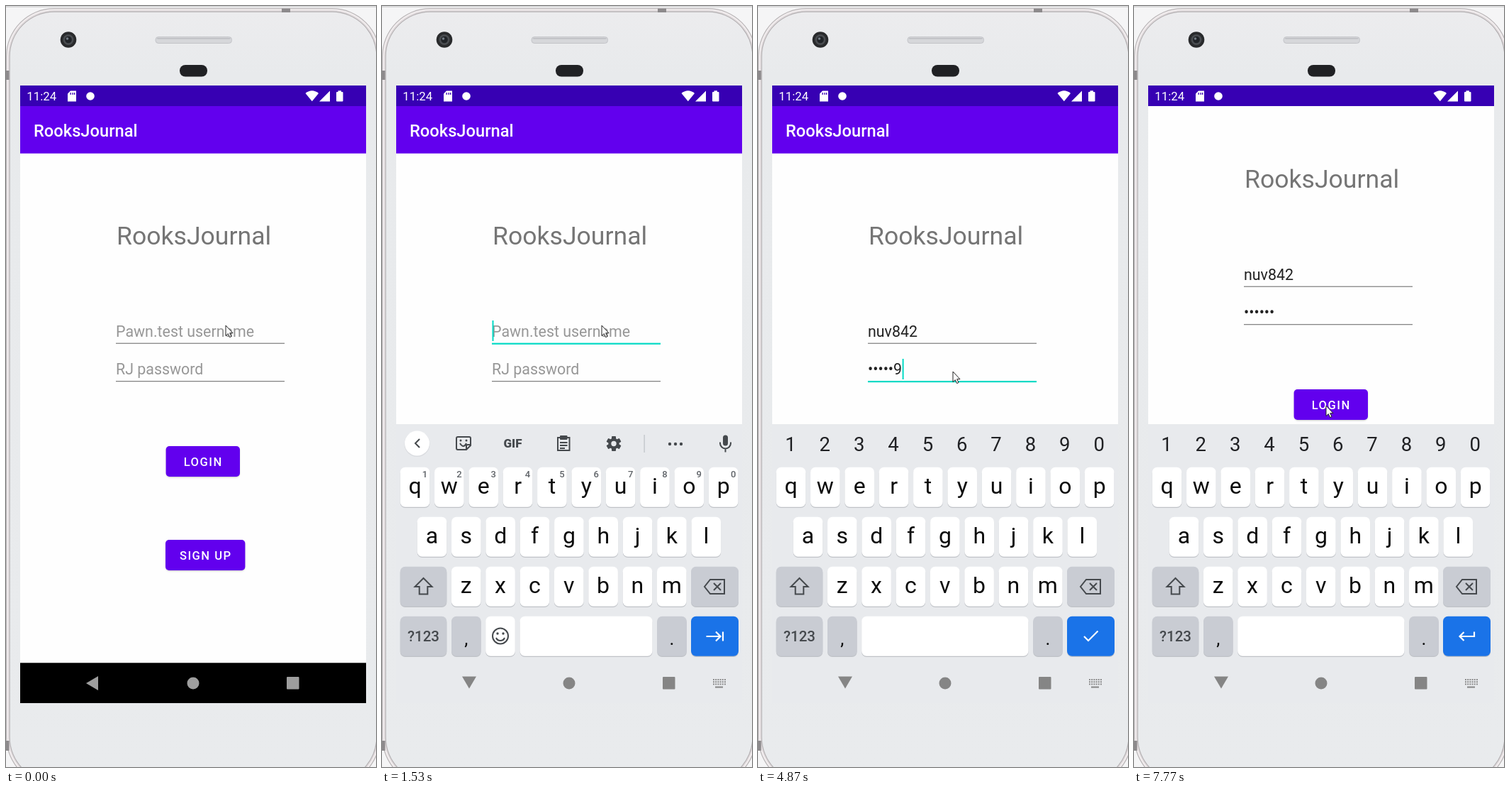
Recreate the animation shown at these times as an HTML page. Size 522 by 1072 pixels, loop 8000 ms.

```html
<!DOCTYPE html>
<html lang="en">
<head>
<meta charset="utf-8">
<title>Login</title>
<style>
html, body { margin: 0; width: 100%; height: 100%; overflow: hidden; background: #f4f4f5; }
svg { display: block; width: 100%; height: 100%; font-family: Roboto, sans-serif; }
.mid { text-anchor: middle; }
.btn { font-size: 16.6px; font-weight: 500; letter-spacing: 1.48px; fill: #fff; }
.field { font-size: 21.4px; }
.key { font-size: 32px; fill: #0c0c0c; text-anchor: middle; }
.mark { font-size: 26px; }
.line { fill: none; stroke: #45494d; stroke-width: 2; }
</style>
</head>
<body>
<svg id="stage" viewBox="0 0 522 1072"></svg>
<script>
const LOOP = 8000, APP = 'RooksJournal', USER = 'nuv842';
const stage = document.getElementById('stage');
const $ = id => document.getElementById(id);
const rect = (x, y, w, h, fill, r = 0, more = '') =>
  `<rect x="${x}" y="${y}" width="${w}" height="${h}" rx="${r}" fill="${fill}" ${more}/>`;
const dot = (x, y, r, fill) => `<circle cx="${x}" cy="${y}" r="${r}" fill="${fill}"/>`;
const path = (d, more = 'class="line"') => `<path d="${d}" ${more}/>`;
const text = (x, y, s, more = '') => `<text x="${x}" y="${y}" ${more}>${s}</text>`;
const group = (id, body, more = '') => `<g id="${id}" ${more}>${body}</g>`;

const PITCH = 48.35;
const key = (x, y, w, fill = '#fff') =>
  rect(x, y + 1, w, 56, '#bfc2c7', 7) + rect(x, y - 0.3, w, 56, fill, 7);

function letterRow(s, x0, y) {
  return [...s].map((c, i) => {
    const x = x0 + i * PITCH;
    return key(x - 20.8, y, 41.6) + text(x, y + 36.5, c, 'class="key"');
  }).join('');
}

const digits = (dx, y, size, fill, weight = 400) => [...'1234567890'].map((c, i) =>
  text(46 + i * PITCH + dx, y, c, `class="mid" font-size="${size}" font-weight="${weight}" fill="${fill}"`)).join('');

const mic = path('M477 614.500v1.500a7.500 7.500 0 0 0 15 0v-1.500M484.500 623.500v5') + rect(481, 604.5, 7, 15, '#45494d', 3.5);

function gear(x, y) {
  let teeth = '';
  for (let a = 0; a < 360; a += 60)
    teeth += rect(x - 3, y - 10.5, 6, 6, '#45494d', 1, `transform="rotate(${a} ${x} ${y})"`);
  return teeth + `<circle cx="${x}" cy="${y}" r="5.7" fill="none" stroke="#45494d" stroke-width="4"/>`;
}

function tools() {
  const sticker = path('M107 607h16a2 2 0 0 1 2 2v10l-6 6h-12a2 2 0 0 1-2-2v-14a2 2 0 0 1 2-2zM125 618h-4a2 2 0 0 0-2 2v5M110 616q5 8 9 0')
    + dot(111, 612, 1.5, '#45494d') + dot(119, 612, 1.5, '#45494d');
  const board = path('M248 608h16.500v18h-16.500zM251 615h10.500M251 619h10.500M251 623h7') + rect(251, 605, 10.5, 6, '#45494d', 1);
  return path('M53 610l-6 6 6 6') + sticker
    + text(184.5, 622, 'GIF', 'class="mid" font-size="17" font-weight="800" fill="#45494d"')
    + board + gear(327, 616.5) + rect(369.5, 604, 1.2, 25, '#bdc1c6')
    + [406, 414, 422].map(x => dot(x, 617, 2.2, '#45494d')).join('');
}

function keyboard() {
  const gray = '#c9ccd3';
  const smile = '<circle cx="167" cy="887.5" r="11" class="line"/>' + path('M161 890a6.500 6.500 0 0 0 12 0')
    + dot(163, 884, 1.7, '#45494d') + dot(171, 884, 1.7, '#45494d');
  const white = 'fill="none" stroke="#fff" stroke-width="2.2"';
  return rect(20, 589, 488, 500, '#e8eaed')
    + letterRow('qwertyuiop', 46.5, 650) + letterRow('asdfghjkl', 70.5, 720)
    + letterRow('zxcvbnm', 118.7, 790)
    + key(25.7, 790, 65.6, gray) + path('M58.500 806l12 12h-6.200v10.500h-11.600v-10.500h-6.200z')
    + key(436, 790, 67, gray) + path('M463 808h20v20h-20l-8-10zM468 813l10 10M478 813l-10 10')
    + key(25.7, 860, 65.6, gray) + text(58.5, 895, '?123', 'class="mid" font-size="20.5" font-weight="500" fill="#45494d"')
    + key(98, 860, 41.6, gray) + text(118.7, 900, ',', 'class="key mark"')
    + key(388.2, 860, 41.6, gray) + text(409, 900, '.', 'class="key mark"')
    + key(436, 860, 67, '#1a73e8')
    + group('textKeys', dot(49.5, 617, 18, '#dadce0') + dot(49.5, 616, 17.5, '#fff') + mic
      + group('tools', tools())
      + group('hints', path('M47 610l6 6-6 6') + text(263, 624, '', 'id="word" class="mid" font-size="21.4" fill="#3c4043"'))
      + digits(14.5, 664, 13, '#5f6368', 500)
      + key(146.2, 860, 41.6) + smile + key(194.5, 860, 187))
    + group('passKeys', digits(0, 627, 27.5, '#202124') + key(146.2, 860, 235.3))
    + group('tabIcon', path('M457.500 888h19.500M471 881.500l6.500 6.500-6.500 6.500M481 881.500v13', white))
    + group('checkIcon', path('M460 888l6 6 13.500-13.500', white))
    + group('enterIcon', path('M480 881.500v6.500h-20M465.500 882l-6 6 6 6', white));
}

function navIcons() {
  let board = '';
  for (let r = 0; r < 3; r++) for (let c = 0; c < 6; c++)
    board += rect(467 + c * 3.2, 948 + r * 3.2, 1.9, 1.9, '#858585');
  return group('back', path('M113 954l17-10v20z', ''))
    + group('down', path('M113 944.500h20l-10 17z', '') + board + rect(470, 958.5, 11, 2, '#858585'))
    + '<circle cx="264" cy="954" r="8.5"/><rect x="396" y="945" width="17.500" height="17.500" rx="1"/>';
}

const field = (id, y) => rect(155, y, 238, 1.3, '#858585', 0, `id="${id}Line"`)
  + text(155, y - 9, '', `id="${id}" class="field"`);

const button = (x, y, w, id) => rect(x + 0.5, y + 1, w - 1, 43, '#00000038', 5, 'filter="url(#soft)"')
  + rect(x, y, w, 43, '#6200ee', 5, `id="${id}"`);

function app() {
  return rect(20, 141, 488, 66.7, '#6200ee')
    + text(39, 183.5, APP, 'font-size="23.7" font-weight="500" fill="#fff"')
    + text(156, 336, APP, 'font-size="35.6" fill="#757575"')
    + field('user', 474.6) + field('pass', 528)
    + rect(155, 467, 0, 1.2, '#333', 0, 'id="spell"') + rect(0, 443, 2, 29, '#03dac5', 0, 'id="caret"')
    + rect(223.5, 624, 109, 44, '#000', 7, 'id="lift" filter="url(#blur)"')
    + button(225.6, 620, 104.4, 'login') + text(278.2, 648, 'LOGIN', 'class="btn mid"')
    + button(225, 752, 112.4, 'signup') + text(281.8, 779.5, 'SIGN UP', 'class="btn mid"');
}

function statusBar() {
  return rect(20, 112, 488, 29, '#3700b3')
    + text(29.3, 133.2, '11:24', 'font-size="16.8" fill="#fff"')
    + path('M91 119.500h8v15h-12v-11z', 'fill="#fff"')
    + [90.5, 93.5, 96].map(x => rect(x, 122, 1.3, 3, '#3700b3')).join('')
    + dot(119, 127, 5.8, '#fff')
    + path('M422.500 123q9.200-7.500 18.500 0l-9.200 11.300z', 'fill="#fff"')
    + path('M457 119.500v15h-15z', 'fill="#fff"')
    + rect(466, 121, 9.5, 13.5, '#fff', 1) + rect(468.5, 119.3, 4.5, 3, '#fff');
}

function phone() {
  const shell = [[0, 3, '#b9b5b7'], [1.2, 4.2, '#f3eff0'], [3, 6, '#e2dcde'], [4.6, 7.6, '#b3b0b2'], [5.7, 8.8, 'url(#body)']];
  return rect(0, 0, 522, 1072, '#f5f5f6') + rect(0, 0.5, 522, 1.2, '#c9c9cb')
    + shell.map(([x, y, c]) => rect(x, y, 528 - 2 * x, 1101 - 2 * y, c, 68 - x)).join('')
    + rect(389, 3.5, 12, 5.5, '#8d8a8c') + rect(0, 91, 4.5, 13, '#8d8a8c') + rect(0, 1035, 4.5, 14, '#8d8a8c')
    + rect(211, 43.5, 107.5, 9, '#d6d7da', 4, 'stroke="#c3c4c8"') + rect(213, 45, 103.5, 1.6, '#bcbdc2', 0.8)
    + dot(88, 47.5, 11.3, '#292a2c') + dot(88, 47.5, 7.5, '#494c50') + dot(88, 47.5, 4.8, '#202327') + dot(86.5, 46, 1.8, '#747c84')
    + rect(245, 83, 39, 16.5, '#202124', 8);
}

stage.innerHTML = `<defs>
  <linearGradient id="body" x1="0" y1="0" x2="0" y2="1"><stop offset="0" stop-color="#ececee"/>
  <stop offset=".08" stop-color="#e8eaec"/><stop offset="1" stop-color="#e9ebed"/></linearGradient>
  <clipPath id="screen"><rect x="20" y="112" width="488" height="870"/></clipPath>
  <filter id="soft"><feGaussianBlur stdDeviation=".9"/></filter>
  <filter id="blur"><feGaussianBlur stdDeviation="2.2"/></filter></defs>`
  + phone() + group('view', rect(20, 112, 488, 870, '#fefefe') + group('app', app()) + statusBar()
    + rect(20, 925.3, 488, 57, '#000', 0, 'id="navBar"')
    + group('keys', keyboard()) + group('nav', navIcons()), 'clip-path="url(#screen)"')
  + path('M0 0v14.600l3.300-3 2.300 5 2.400-1.100-2.300-4.800h4.300z', 'id="mouse" fill="#fff" stroke="#222" stroke-width="1"');

// Each step changes part of the screen state and holds until the next.
const STEPS = [
  [0, { focus: '', caret: 0, user: '', pass: '', spell: 0, word: '', keys: null, nav: 0,
    mode: 'tab', mouse: [310, 450], pan: 0, lift: 0, glow: 0 }],
  [1090, { focus: 'user', caret: 1 }],
  [1240, { keys: 210, nav: 1 }],
  [1380, { keys: 63.5 }],
  [1530, { keys: 0, nav: 2 }],
  [1650, { caret: 0 }],
  [1950, { caret: 1 }],
  [2250, { user: USER.slice(0, 1), spell: 1, word: USER.slice(0, 1) }],
  [2370, { user: USER.slice(0, 4), spell: 4, word: USER.slice(0, 3) }],
  [2520, { user: USER, word: USER.slice(0, 4) }],
  [2670, { spell: 6, word: USER }],
  [2970, { caret: 0, mouse: [306, 460] }],
  [3090, { mouse: [290, 490] }],
  [3240, { mouse: [275, 515] }],
  [3360, { focus: 'pass', caret: 1, spell: 0 }],
  [3510, { mode: 'check' }],
  [3660, { caret: 0 }],
  [3940, { pass: 'a', caret: 1 }],
  [4060, { pass: '•k' }],
  [4310, { pass: '••t' }],
  [4600, { pass: '•••7' }],
  [4750, { pass: '••••2' }],
  [4870, { pass: '•••••9' }],
  [5300, { pass: '••••••', caret: 0 }],
  [5450, { mouse: [310, 580] }],
  [5570, { mouse: [390, 730] }],
  [5720, { mouse: [455, 870] }],
  [5870, { mouse: [477, 913], caret: 1 }],
  [6020, { focus: '' }],
  [6140, { mode: 'enter', pan: -45 }],
  [6290, { pan: -80, mouse: [386, 764] }],
  [6410, { mouse: [340, 690] }],
  [6560, { mouse: [295, 610] }],
  [6680, { mouse: [271, 563] }],
  [6830, { lift: 0.12, glow: 0.5 }],
  [6950, { lift: 0.25, glow: 1 }],
  [7240, { lift: 0.12 }],
  [7370, { lift: 0 }],
  [7650, { glow: 0.5 }],
  [7770, { glow: 0 }]
];

const show = (id, on) => $(id).setAttribute('display', on ? 'inline' : 'none');
function set(id, attrs) { for (const k in attrs) $(id).setAttribute(k, attrs[k]); }

function drawField(id, value, hint, y, focused) {
  $(id).textContent = value || hint;
  set(id, { fill: value ? '#212121' : '#979797' });
  set(id + 'Line', { fill: focused ? '#03dac5' : '#858585', y, height: focused ? 2.2 : 1.3 });
}

function draw(t) {
  const s = Object.assign({}, ...STEPS.filter(([at]) => at <= t).map(([, change]) => change));
  drawField('user', s.user, 'Pawn.test username', 474.6, s.focus === 'user');
  drawField('pass', s.pass, 'RJ password', 528, s.focus === 'pass');
  set('spell', { width: s.spell ? $('user').getSubStringLength(0, s.spell) : 0 });

  show('caret', s.focus && s.caret);
  if (s.focus) {
    const width = s[s.focus] ? $(s.focus).getComputedTextLength() : 0;
    set('caret', { x: 155.5 + width, y: s.focus === 'user' ? 443 : 497 });
  }

  set('app', { transform: `translate(0 ${s.pan})` });
  set('login', { fill: `rgb(${98 + 24 * s.glow},${36 * s.glow},${238 + 2 * s.glow})` });
  set('lift', { opacity: s.lift });

  show('keys', s.keys !== null);
  set('keys', { transform: `translate(0 ${s.keys || 0})` });
  show('textKeys', s.mode === 'tab');
  show('passKeys', s.mode !== 'tab');
  for (const m of ['tab', 'check', 'enter']) show(m + 'Icon', s.mode === m);
  show('tools', !s.word);
  show('hints', s.word);
  $('word').textContent = s.word;

  set('navBar', { fill: s.nav ? '#e8eaed' : '#000' });
  set('nav', { fill: ['#9e9e9e', '#d7d7d7', '#858585'][s.nav], opacity: s.nav === 1 ? 0.75 : 1 });
  show('back', s.nav < 2);
  show('down', s.nav === 2);
  set('mouse', { transform: `translate(${s.mouse})` });
}

let start = null, last = -1;
function tick(now) {
  start ??= now;
  const t = (now - start) % LOOP;
  const step = STEPS.filter(([at]) => at <= t).length;
  if (step !== last) draw(t);
  last = step;
  requestAnimationFrame(tick);
}
draw(0);
requestAnimationFrame(tick);
</script>
</body>
</html>
```
